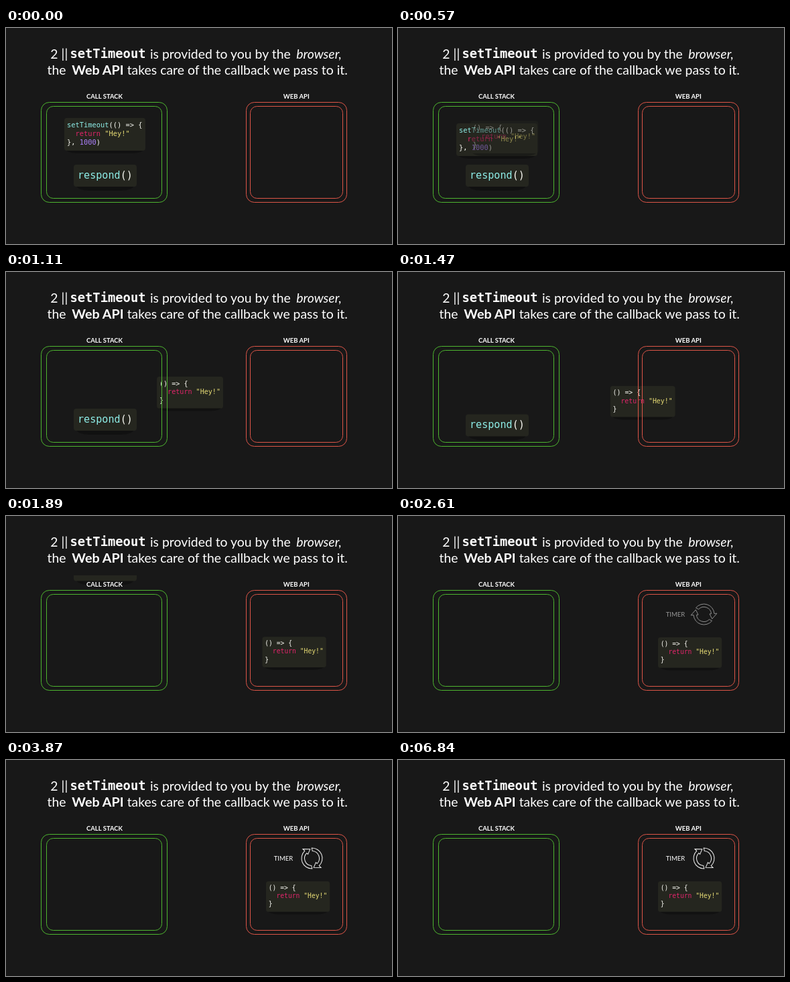
Recreate the animation shown at these times as an HTML page. Size 576 by 324 pixels, loop 6870 ms.

```html
<!DOCTYPE html>
<html lang="en">
<head>
<meta charset="utf-8">
<title>setTimeout and the Web API</title>
<style>
  html, body { margin: 0; width: 100%; height: 100%; overflow: hidden; background: #181818; }
  svg { display: block; width: 576px; height: 324px; }
  text { fill: #fff; font-family: Lato, "Open Sans", sans-serif; white-space: pre; }
  .title text { font-size: 19.4px; text-anchor: middle; }
  .title .bold { font-size: 19.8px; font-weight: 700; }
  .title .mono { font: 700 18.8px "DejaVu Sans Mono", monospace; }
  .label { font-size: 9.5px; font-weight: 700; text-anchor: middle; }
  .box { fill: none; stroke: #4db52f; }
  .api { stroke: #dd5548; }
  .card text { font: 10.4px "DejaVu Sans Mono", monospace; fill: #f8f8f2; }
  .card .big { font-size: 15.1px; }
  .card rect { fill: #25261f; }
  .card .shadow { fill: #111; }
  .card .fn { fill: #8eeee8; }
  .card .key { fill: #e3256b; }
  .card .str { fill: #e6db74; }
  .card .num { fill: #ae81ff; }
</style>
</head>
<body>
<svg viewBox="0 0 576 324">
  <clipPath id="below"><rect y="89" width="576" height="235"/></clipPath>

  <g clip-path="url(#below)">
    <g id="respond" class="card">
      <rect class="shadow" x="4" y="23" width="86" height="16" rx="20" ry="8"/>
      <rect width="94" height="33" rx="4"/>
      <text class="big" x="6" y="21"><tspan class="fn">respond</tspan>()</text>
    </g>
    <g id="timeout" class="card">
      <rect class="shadow" x="3" y="40" width="115" height="13" rx="16" ry="6"/>
      <rect width="121" height="49" rx="4"/>
      <text x="4" y="14"><tspan class="fn">setTimeout</tspan>(() =&gt; {</text>
      <text x="16.5" y="27"><tspan class="key">return</tspan> <tspan class="str">"Hey!"</tspan></text>
      <text x="4" y="40">}, <tspan class="num">1000</tspan>)</text>
    </g>
    <g id="callback" class="card">
      <rect class="shadow" x="3" y="40" width="96" height="13" rx="16" ry="6"/>
      <rect width="102" height="49" rx="4"/>
      <text x="4" y="14">() =&gt; {</text>
      <text x="16.5" y="27"><tspan class="key">return</tspan> <tspan class="str">"Hey!"</tspan></text>
      <text x="4" y="40">}</text>
    </g>
  </g>

  <rect class="box" x="52.5" y="111.5" width="188" height="150" rx="12"/>
  <rect class="box" x="60.5" y="117.5" width="172" height="138" rx="10"/>
  <rect class="box api" x="358.5" y="111.5" width="150" height="150" rx="12"/>
  <rect class="box api" x="364.5" y="117.5" width="138" height="138" rx="10"/>
  <text class="label" x="147" y="106">CALL STACK</text>
  <text class="label" x="433.3" y="106">WEB API</text>

  <g id="timer">
    <text class="label" x="414" y="150.5" style="font-weight:400">TIMER</text>
    <g id="arrows" fill="none" stroke="#eee"></g>
  </g>

  <g class="title">
    <text x="79.3" y="45.5">2 ||</text>
    <text class="mono" x="152" y="45">setTimeout</text>
    <text x="319.8" y="45.5">is provided to you by the</text>
    <text x="467" y="45.5" font-style="italic">browser,</text>
    <text x="75.5" y="70">the</text>
    <text class="bold" x="137" y="70">Web API</text>
    <text x="345.3" y="70">takes care of the callback we pass to it.</text>
  </g>
</svg>
<script>
const LOOP = 6870;
const el = id => document.getElementById(id);
const set = (id, name, value) => el(id).setAttribute(name, value);
const ramp = (t, from, to) => Math.min(1, Math.max(0, (t - from) / (to - from)));
const ease = p => (1 - Math.cos(Math.PI * p)) / 2;
const mix = (a, b, p) => a + (b - a) * p;
const polar = (r, deg) => {
  const a = deg * Math.PI / 180;
  return `${(r * Math.cos(a)).toFixed(2)} ${(r * Math.sin(a)).toFixed(2)}`;
};

// One outlined, curved arrow; its twin is turned half way round
const arrow = `M${polar(15.5, 219)}A15.5 15.5 0 0 1 ${polar(15.5, 356)}L${polar(19.5, 356)}` +
  `L${polar(14, 29)}L${polar(8.5, 356)}L${polar(11, 356)}A11 11 0 0 0 ${polar(11, 224)}Z`;
el('arrows').innerHTML = `<path d="${arrow}"/><path d="${arrow}" transform="rotate(180)"/>`;

// Dips a little, then shoots upwards
const lift = (t, start) => {
  const u = Math.max(0, t - start);
  return -1.25e-6 * u * u * (u - 360);
};

function draw(t) {
  set('timeout', 'transform', `translate(87 ${135 + lift(t, 297)})`);
  set('respond', 'transform', `translate(101 ${205 + lift(t, 1254)})`);

  const p = ease(ramp(t, 270, 2045));
  set('callback', 'transform',
    `translate(${mix(87, 388, p)} ${mix(136, 182, p)}) scale(${mix(1, 0.933, p)})`);
  set('callback', 'opacity', ramp(t, 300, 900));

  set('timer', 'opacity', ramp(t, 2250, 2910));
  set('arrows', 'transform', `translate(456.5 147.5) rotate(${410 * ease(ramp(t, 2970, 3870))})`);
}

const start = performance.now();
function tick() {
  draw((performance.now() - start) % LOOP);
  requestAnimationFrame(tick);
}
tick();
</script>
</body>
</html>
```
